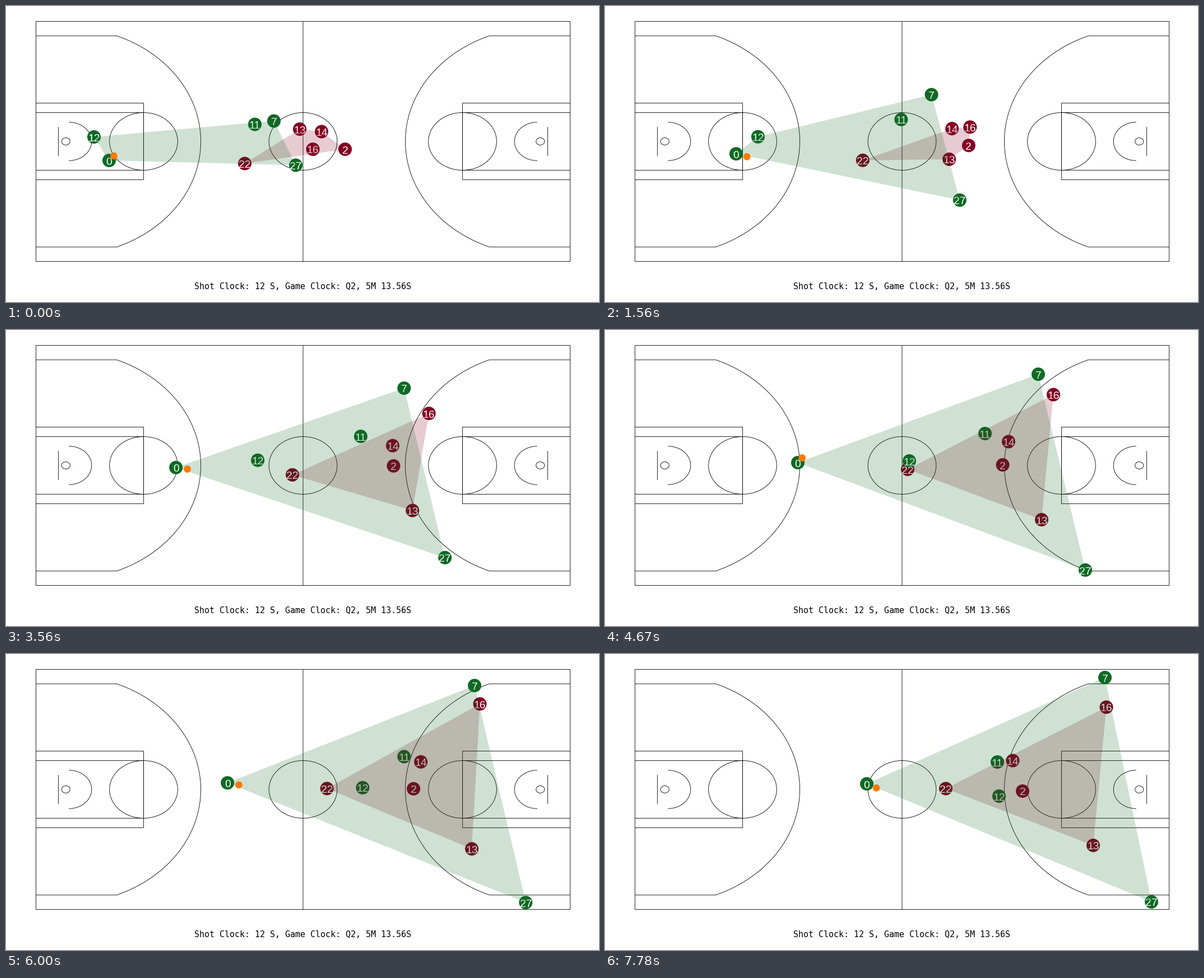
Recreate the animation shown at these times as a matplotlib script. Size 1058 by 529 pixels, loop 8000 ms.

```python
import numpy as np
import matplotlib.pyplot as plt
from matplotlib.animation import FuncAnimation
from matplotlib.patches import Circle, Polygon

W, H, DPI = 1058, 529, 64
PT = 72 / DPI  # points per pixel
LOOP_MS, TICK_MS, STEPS = 8000, 40, 36

GREEN, RED, ORANGE = "#0f6924", "#830021", "#ff7a05"
LEFT, RIGHT, TOP, BOTTOM = 53.5, 1006.5, 27.5, 456.5
MID_X, MID_Y = (LEFT + RIGHT) / 2, (TOP + BOTTOM) / 2
FT_X, FT_Y = (RIGHT - LEFT) / 94, (BOTTOM - TOP) / 50

# Each player runs along a cubic curve through four points
KEYS = (0, 11, 21, 35)
HOME = {
    "0": [(184, 276), (264, 256), (344, 237), (467, 232)],
    "7": [(478, 205.5), (641, 133), (773, 79), (892, 42)],
    "11": [(444, 211.5), (577, 197), (678, 185), (700, 193)],
    "12": [(157, 234), (350, 233), (543, 234), (703, 254)],
    "27": [(517, 284.5), (701, 376.5), (857, 429), (975, 443)],
}
AWAY = {
    "2": [(605, 256), (669.5, 246), (709.5, 241), (745, 245)],
    "13": [(524, 220), (665, 298.5), (779, 339), (871, 342)],
    "14": [(563, 224.5), (652, 214), (720, 199.5), (727.5, 190.5)],
    "16": [(547.5, 256), (701, 187), (800, 115.5), (894.5, 95)],
    "22": [(426, 281.5), (482, 269), (540, 249), (608, 240.5)],
}


def run(points):
    """Position at every step of the cubic through four key points."""
    return np.vander(np.arange(STEPS), 4) @ np.polyfit(KEYS, points, 3)


def dribble(step):
    """Ball position relative to its handler: a sway around the front hand."""
    phase = 2 * np.pi * (step - 6) / 20.5
    return 14 + 6.5 * np.cos(2 * phase), 2 + 10.5 * np.sin(phase)


def convex_hull(points):
    pts = sorted(map(tuple, points))

    def chain(seq):
        out = []
        for x, y in seq:
            while len(out) > 1:
                (ax, ay), (bx, by) = out[-2:]
                if (bx - ax) * (y - ay) - (by - ay) * (x - ax) > 0:
                    break
                out.pop()
            out.append((x, y))
        return out[:-1]

    return chain(pts) + chain(pts[::-1])


fig = plt.figure(figsize=(W / DPI, H / DPI), dpi=DPI, facecolor="white")
ax = fig.add_axes([0, 0, 1, 1])
ax.set_xlim(0, W)
ax.set_ylim(H, 0)
ax.axis("off")


def line(xs, ys):
    ax.plot(xs, ys, color="black", lw=0.85 * PT, zorder=1, snap=False,
            solid_capstyle="butt", solid_joinstyle="miter")


def arc(cx, r_ft, start=0, end=360):
    t = np.radians(np.linspace(start, end, 181))
    return cx + r_ft * FT_X * np.cos(t), MID_Y + r_ft * FT_Y * np.sin(t)


def draw_end(mirror):
    """One end of the court, laid out from the left baseline."""
    def put(xs, ys):
        xs = np.asarray(xs, float)
        line(LEFT + RIGHT - xs if mirror else xs, ys)

    hoop = LEFT + 5.25 * FT_X
    free_throw = LEFT + 192
    for half in (68.5, 51.5):
        put([LEFT, free_throw, free_throw, LEFT],
            [MID_Y - half, MID_Y - half, MID_Y + half, MID_Y + half])
    put(*arc(free_throw, 6))

    corner = np.degrees(np.arcsin(22 / 23.75))
    xs, ys = arc(hoop, 23.75, -corner, corner)
    put(np.r_[LEFT, xs, LEFT], np.r_[ys[0], ys, ys[-1]])

    board = LEFT + 40
    put([board, board], [MID_Y - 3 * FT_Y, MID_Y + 3 * FT_Y])
    put(*arc(hoop, 0.75))
    put(*arc(hoop + 5.5, 4, -90, 90))


line([LEFT, RIGHT, RIGHT, LEFT, LEFT], [TOP, TOP, BOTTOM, BOTTOM, TOP])
line([MID_X, MID_X], [TOP, BOTTOM])
line(*arc(MID_X, 6))
draw_end(False)
draw_end(True)

ax.text(MID_X, 505.5, "Shot Clock: 12 S, Game Clock: Q2, 5M 13.56S",
        family="DejaVu Sans Mono", size=15 * PT, ha="center", va="baseline")


class Team:
    def __init__(self, players, color, order):
        self.paths = [run(points) for points in players.values()]
        self.dots = [ax.add_patch(Circle((0, 0), 12, fc=color, lw=0, zorder=2 + order))
                     for _ in players]
        self.labels = [ax.text(0, 0, name, color="white", family="Liberation Sans",
                               size=19.3 * PT, ha="center", va="baseline", zorder=4)
                       for name in players]
        self.hull = ax.add_patch(Polygon([(0, 0), (1, 0), (0, 1)], fc=color,
                                         alpha=0.2, lw=0, zorder=5 + order))

    def move(self, step):
        spots = [path[step] for path in self.paths]
        for (x, y), dot, label in zip(spots, self.dots, self.labels):
            dot.center = x, y
            label.set_position((x, y + 7.5))
        self.hull.set_xy(convex_hull(spots))


away = Team(AWAY, RED, 0)
home = Team(HOME, GREEN, 1)
ball = ax.add_patch(Circle((0, 0), 6.4, fc=ORANGE, lw=0, zorder=8))


def update(tick):
    # Positions hold between steps; the lead keeps a step from landing a tick late
    lead = 0.75 * TICK_MS
    step = int((tick * TICK_MS + lead) * STEPS / LOOP_MS)
    away.move(step)
    home.move(step)
    ball.center = tuple(home.paths[0][step] + dribble(step))
    return []


anim = FuncAnimation(fig, update, frames=LOOP_MS // TICK_MS, interval=TICK_MS,
                     init_func=lambda: update(0), repeat=True, repeat_delay=0,
                     blit=False)
plt.show()
```
